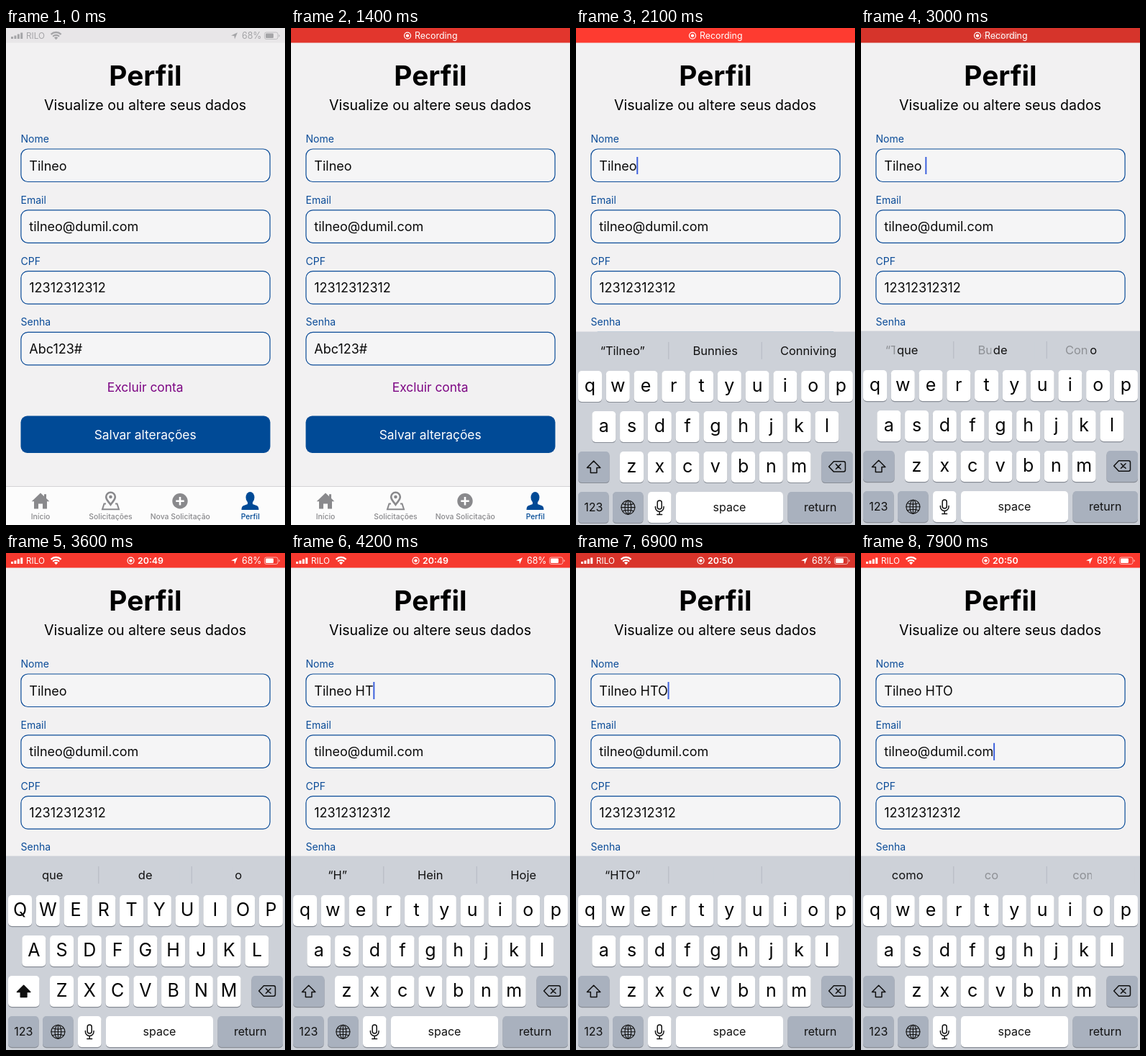
These frames come from a looping animation (388x690 px, 8000 ms). An HTML page:

```html
<!DOCTYPE html>
<html lang="pt">
<head>
<meta charset="utf-8">
<style>
  html, body { margin: 0; width: 100%; height: 100%; overflow: hidden; background: #f2f1f2; }
  svg { display: block; width: 100vw; height: 100vh; font-family: Inter, "Liberation Sans", sans-serif; }
  text { white-space: pre; }
  .mid { text-anchor: middle; }
  .label { font-size: 14px; fill: #0b4c98; }
  .value { font-size: 18px; fill: #0a0a0a; }
  .box { fill: #f5f5f6; stroke: #0b4c98; stroke-width: 1.2; }
  .tab { font-size: 10.4px; font-weight: 500; text-anchor: middle; }
  .status { font-size: 12.4px; fill: currentColor; }
  .key { fill: #fff; }
  .shade { fill: #888d96; }
  .special { fill: #a9b1be; }
  .letter { font-size: 25px; text-anchor: middle; fill: #050505; }
  .small { font-size: 16px; text-anchor: middle; fill: #111; }
  .hint { font-size: 16.5px; text-anchor: middle; fill: #111; }
  .line { fill: none; stroke: #111; stroke-width: 1.5; stroke-linejoin: round; stroke-linecap: round; }
  .thin { stroke-width: 1.1; }
</style>
</head>
<body>
<svg id="stage" viewBox="0 0 388 690">
  <rect width="388" height="690" fill="#f2f1f2"/>
  <rect width="388" height="20.5" fill="#e8e6e8"/>
  <rect id="redBar" width="388" height="20.5"/>

  <g id="sides" class="status">
    <path d="M7 12h3v3h-3zM11.4 10.5h3v4.5h-3zM15.8 8.5h3v6.5h-3zM20.2 6.5h3v8.5h-3z"/>
    <text x="28" y="14.8" font-size="11.7">RILO</text>
    <g fill="none" stroke="currentColor" stroke-width="2.3">
      <path d="M62.6 8.8a10.2 10.2 0 0 1 14 0M65.2 11.7a6.3 6.3 0 0 1 8.8 0"/>
    </g>
    <path d="M69.6 16.2l-2.6-2.7a3.7 3.7 0 0 1 5.2 0z"/>
    <path d="M322 6.2l-9 4.2 4.4.6.6 4.4z"/>
    <text x="328" y="14.8">68%</text>
    <rect x="359.5" y="6" width="18.5" height="9.5" rx="2.5" fill="none" stroke="currentColor" opacity=".6"/>
    <rect x="361" y="7.5" width="11" height="6.5" rx="1.2"/>
    <path d="M379.3 9v3.5q1.6-.4 1.6-1.75t-1.6-1.75z" opacity=".6"/>
  </g>
  <g id="recording" class="status" color="#fff">
    <circle cx="162" cy="10.6" r="4.5" fill="none" stroke="#fff" stroke-width="1.2"/>
    <circle cx="162" cy="10.6" r="2.2"/>
    <text x="172" y="15">Recording</text>
  </g>
  <g id="clock" class="status" color="#fff">
    <circle cx="173.5" cy="10.6" r="4.5" fill="none" stroke="#fff" stroke-width="1.2"/>
    <circle cx="173.5" cy="10.6" r="2.2"/>
    <text id="clockText" x="183" y="15" font-weight="600"></text>
  </g>

  <text class="mid" x="194" y="80" font-size="38.8" font-weight="700">Perfil</text>
  <text class="mid" x="193.5" y="114" font-size="19.6">Visualize ou altere seus dados</text>
  <g id="form"></g>
  <rect id="caret" width="2" height="24" fill="#3f62dd"/>
  <text class="mid" x="193.7" y="505" font-size="17.4" fill="#7d0684">Excluir conta</text>
  <rect x="20.5" y="538.5" width="347" height="51.5" rx="9" fill="#004a96"/>
  <text class="mid" x="193.7" y="571" font-size="17.4" fill="#fff">Salvar alterações</text>

  <g fill="#89898c">
    <rect y="636.5" width="388" height="54" fill="#fcfcfc"/>
    <rect y="636" width="388" height="1" fill="#d4d3d5"/>
    <path d="M48 645.5l5 4.7v-3h3v5.8l4.3 4.2h-3.3v10.3h-6v-7h-6v7h-6v-10.3h-3.3z"/>
    <path fill-rule="evenodd" d="M145.5 643.5a7.6 7.6 0 0 1 7.6 7.6c0 4.2-4.3 8.2-7.6 13-3.3-4.8-7.6-8.8-7.6-13a7.6 7.6 0 0 1 7.6-7.6zM145.5 646a5 5 0 0 0-5 5c0 2.5 2.6 5.4 5 8.6 2.4-3.2 5-6.1 5-8.6a5 5 0 0 0-5-5z"/>
    <circle cx="145.5" cy="651" r="2.3"/>
    <path d="M139 660.5h-2.5l-2.5 7.7h23l-2.5-7.7h-2.5" fill="none" stroke="#89898c" stroke-width="2"/>
    <circle cx="242" cy="656.7" r="10.7"/>
    <path d="M242 651v11.4M236.3 656.7h11.4" stroke="#fff" stroke-width="2.6"/>
    <g fill="#004a96">
      <ellipse cx="339.5" cy="651.7" rx="6" ry="7.7"/>
      <path d="M336 656h7v5l6 2.2q2.5 1 2.5 5.8h-24q0-4.8 2.5-5.8l6-2.2z"/>
      <text class="tab" x="339.7" y="682">Perfil</text>
    </g>
    <text class="tab" x="48" y="682">Início</text>
    <text class="tab" x="145.5" y="682">Solicitações</text>
    <text class="tab" x="242.3" y="682">Nova Solicitação</text>
  </g>

  <g id="keyboard">
    <rect y="420.6" width="388" height="272" fill="#cdd1d8"/>
    <g id="hints"></g>
    <path d="M128.8 435v24M258.2 435v24" stroke="#b4b9c2"/>
    <g id="keys"></g>
    <path id="shiftIcon" class="line" d="M24.6 600.2l9.2 9.3h-4.9v7h-8.6v-7h-4.9z"/>
    <path id="deleteIcon" class="line" d="M358.5 600.8h13.5q2.5 0 2.5 2.5v9.4q0 2.5-2.5 2.5h-13.5l-6.8-7.2z"/>
    <path id="deleteCross" class="line" d="M361.5 604.7l6.6 6.6M368.1 604.7l-6.6 6.6"/>
    <g fill="none">
      <circle class="line thin" cx="72.4" cy="664.7" r="9.5"/>
      <ellipse class="line thin" cx="72.4" cy="664.7" rx="4.4" ry="9.5"/>
      <path class="line thin" d="M72.4 655.2v19M62.9 664.7h19M65 659.7q7.4 2.8 14.8 0M65 669.7q7.4-2.8 14.8 0"/>
    </g>
    <rect class="line" x="113.2" y="655" width="6" height="12" rx="3"/>
    <path class="line" d="M110.4 663.5v1.2a5.8 5.8 0 0 0 11.6 0v-1.2M116.2 670.5v4M112.8 674.5h6.8"/>
  </g>
</svg>
<script>
const LOOP = 8000;
const $ = id => document.getElementById(id);

function add(parent, tag, attrs, content = '') {
  const node = document.createElementNS('http://www.w3.org/2000/svg', tag);
  for (const name in attrs) node.setAttribute(name, attrs[name]);
  node.textContent = content;
  return parent.appendChild(node);
}
const ramp = (t, from, to) => Math.min(1, Math.max(0, (t - from) / (to - from)));
const within = (t, spans) => spans.some(([from, to]) => t >= from && t < to);
// Latest entry whose start time has passed.
const indexAt = (list, t) => list.reduce((best, [start], i) => t >= start ? i : best, 0);

const USER = 'Tilneo';
const FIELD_STEP = 84.8;
const values = [['Nome', USER], ['Email', 'tilneo@dumil.com'], ['CPF', '12312312312'], ['Senha', 'Abc123#']]
  .map(([label, value], i) => {
    const y = i * FIELD_STEP;
    add($('form'), 'text', { class: 'label', x: 20.5, y: 159 + y }, label);
    add($('form'), 'rect', { class: 'box', x: 20.9, y: 168 + y, width: 346.2, height: 45.5, rx: 9.5 });
    return add($('form'), 'text', { class: 'value', x: 32.3, y: 197.5 + y }, value);
  });

function addKey(x, y, width, kind = 'key') {
  add($('keys'), 'rect', { class: 'shade', x, y: y + 1.2, width, height: 43, rx: 5 });
  return add($('keys'), 'rect', { class: kind, x, y, width, height: 43, rx: 5 });
}
const letters = [];
[['qwertyuiop', 3], ['asdfghjkl', 22.3], ['zxcvbnm', 61]].forEach(([row, left], r) => {
  [...row].forEach((letter, i) => {
    const x = left + i * 38.77, y = 475 + r * 56;
    addKey(x, y, 33);
    letters.push([add($('keys'), 'text', { class: 'letter', x: x + 16.5, y: y + 29 }), letter]);
  });
});
const shiftKey = addKey(3, 587, 43.5, 'special');
const deleteKey = addKey(341.5, 587, 43.5, 'special');
for (const [x, width, kind, text] of [
  [3, 42.5, 'special', '123'], [51, 42.5, 'special', ''], [100, 32.5, 'key', ''],
  [139, 149, 'key', 'space'], [294.5, 90.5, 'special', 'return']
]) {
  addKey(x, 643, width, kind);
  add($('keys'), 'text', { class: 'small', x: x + width / 2, y: 669.7 }, text);
}

const slots = [64.7, 193.7, 323.2].map(x => ({
  x,
  ghost: add($('hints'), 'text', { class: 'hint', x, y: 453 }),
  cover: add($('hints'), 'rect', { y: 436, height: 24, width: 60, fill: '#cdd1d8' }),
  hint: add($('hints'), 'text', { class: 'hint', x, y: 453 })
}));

const typing = [
  [0, USER], [2900, USER + ' '], [3700, USER + ' H'], [4130, USER + ' HT'], [4800, USER + ' HTa'],
  [5300, USER + ' HTao'], [5850, USER + ' HTa'], [6200, USER + ' HT'], [6650, USER + ' HTO']
];
const hints = [
  [0, `“${USER}”`, 'Bunnies', 'Conniving'], [2960, 'que', 'de', 'o'], [3720, '“H”', 'Hein', 'Hoje'],
  [4280, '“HT”', '', ''], [4860, '“HTa”', '', ''], [5360, '“HTao”', '', ''], [5900, '“HTa”', '', ''],
  [6260, '“HT”', '', ''], [6710, '“HTO”', '', ''], [7400, '“com”', 'como', 'comum'], [7860, 'como', '', '']
];
const FOCUS = 1800, EMAIL_FOCUS = 7400, KEYBOARD_START = 1670;
const shiftSpans = [[3350, 3700], [3950, 4130], [6380, 6650]];
const deleteSpans = [[5750, 5900], [6150, 6280]];

function drawStatus(t) {
  const glow = (1 + Math.cos((t - 2000) / 1900 * 2 * Math.PI)) / 2;
  $('redBar').setAttribute('fill', `rgb(${214 + 41 * glow},${52 + 7 * glow},${43 + 5 * glow})`);
  $('redBar').setAttribute('opacity', ramp(t, 50, 400));
  const early = t < 1000;
  $('sides').setAttribute('color', early ? '#a5a5a8' : '#fff');
  $('sides').setAttribute('opacity', early ? 1 - ramp(t, 0, 300) : ramp(t, 3050, 3250));
  $('recording').setAttribute('opacity', ramp(t, 150, 400) * (1 - ramp(t, 3000, 3200)));
  $('clock').setAttribute('opacity', ramp(t, 2950, 3200));
  $('clockText').textContent = t < 5000 ? '20:49' : '20:50';
}

function drawForm(t) {
  const [changed, text] = typing[indexAt(typing, t)];
  values[0].textContent = text;
  const field = t < EMAIL_FOCUS ? 0 : 1;
  const idle = t - Math.max(changed, field ? EMAIL_FOCUS : FOCUS);
  const caret = $('caret');
  caret.setAttribute('x', 32.3 + values[field].getComputedTextLength() - 0.3);
  caret.setAttribute('y', 179 + field * FIELD_STEP);
  caret.setAttribute('opacity', t >= FOCUS && idle % 1000 < 650 ? 1 : 0);
}

function drawHints(t) {
  const i = indexAt(hints, t);
  const [start, ...now] = hints[i];
  const before = i ? hints[i - 1].slice(1) : now;
  const fade = i ? 1 - ramp(t, start, start + 160) : 0;
  slots.forEach(({ x, ghost, cover, hint }, n) => {
    hint.textContent = now[n];
    ghost.textContent = before[n];
    ghost.setAttribute('opacity', before[n] === now[n] ? 0 : 0.45 * fade);
    cover.setAttribute('x', x - hint.getComputedTextLength() / 2 - 2.5);
  });
}

function drawKeyboard(t) {
  const s = Math.max(0, t - KEYBOARD_START) * 0.01826;
  const drop = 272 * (1 + s) * Math.exp(-s);
  $('keyboard').setAttribute('transform', `translate(0 ${drop.toFixed(2)})`);
  const shift = within(t, shiftSpans), del = within(t, deleteSpans);
  for (const [node, letter] of letters) node.textContent = shift ? letter.toUpperCase() : letter;
  shiftKey.setAttribute('class', shift ? 'key' : 'special');
  deleteKey.setAttribute('class', del ? 'key' : 'special');
  $('shiftIcon').style.fill = shift ? '#111' : 'none';
  $('deleteIcon').style.fill = del ? '#111' : 'none';
  $('deleteCross').style.stroke = del ? '#fff' : '#111';
}

function draw(t) {
  drawStatus(t);
  drawForm(t);
  drawHints(t);
  drawKeyboard(t);
}

const begin = performance.now();
function frame() {
  draw((performance.now() - begin) % LOOP);
  requestAnimationFrame(frame);
}
draw(0);
requestAnimationFrame(frame);
</script>
</body>
</html>
```
